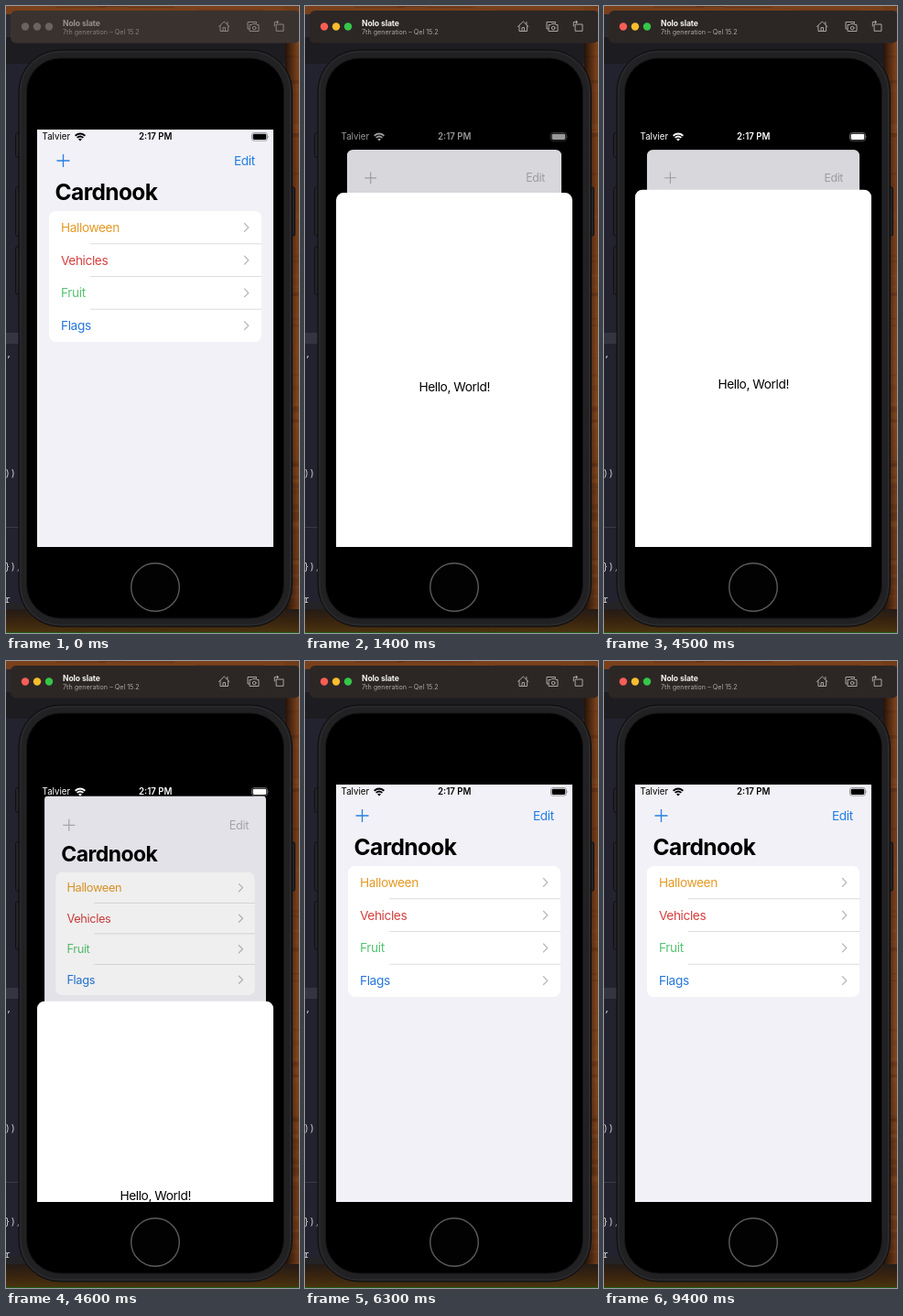
Recreate the animation shown at these times as an HTML page. Size 320 by 685 pixels, loop 9.5 s.

```html
<!DOCTYPE html>
<html lang="en">
<head>
<meta charset="utf-8">
<title>Sheet demo</title>
<style>
  html, body { margin: 0; height: 100%; overflow: hidden; background: #000; }
  svg { display: block; width: 100%; height: 100%; }
  text { font-family: Inter, Roboto, "Liberation Sans", sans-serif; }
  .body { font-size: 13.7px; letter-spacing: -.4px; }
  .code { font: 10px "Noto Sans Mono", "DejaVu Sans Mono", monospace; fill: #d8d8dc; }
  .code text { font: inherit; }
  .status { font-size: 9.7px; }
  .line { fill: none; stroke-linecap: round; stroke-linejoin: round; }
</style>
</head>
<body>
<svg viewBox="0 0 320 685">
  <defs>
    <linearGradient id="wood" x2="0" y2="1">
      <stop offset="0" stop-color="#7a401b"/>
      <stop offset=".3" stop-color="#733c1a"/>
      <stop offset=".6" stop-color="#7f451e"/>
      <stop offset="1" stop-color="#633416"/>
    </linearGradient>
    <linearGradient id="shade">
      <stop offset="0" stop-opacity=".7"/>
      <stop offset="1" stop-opacity="0"/>
    </linearGradient>
    <linearGradient id="floor" x2="0" y2="1">
      <stop offset="0" stop-color="#241c17"/>
      <stop offset=".5" stop-color="#38230f"/>
      <stop offset="1" stop-color="#4a3410"/>
    </linearGradient>
    <clipPath id="screen"><rect x="34" y="135" width="258" height="456"/></clipPath>
    <clipPath id="cardClip"><rect id="cardShape" x="34" y="135" width="258" height="470"/></clipPath>
  </defs>

  <!-- desktop and editor -->
  <rect width="320" height="685" fill="url(#wood)"/>
  <g id="grain"></g>
  <rect x="305" y="40" width="13" height="626" fill="url(#shade)"/>
  <rect y="9" width="305" height="657" fill="#2a2a30"/>
  <rect y="34" width="305" height="29" fill="#1d1c21"/>
  <rect y="63" width="305" height="588" fill="#22232f"/>
  <rect y="357" width="14" height="12" fill="#343541"/>
  <path d="M0 569.5H20" stroke="#3a3b46"/>
  <rect y="651" width="305" height="8" fill="#242326"/>
  <rect y="659" width="320" height="25" fill="url(#floor)"/>
  <g class="code">
    <text x="0" y="383">,</text>
    <text x="-1.5" y="514">))</text>
    <text x="-1.5" y="616">}),</text>
    <text x="-1.5" y="652">r</text>
  </g>
  <rect y="684" width="320" height="1" fill="#1f5a17"/>

  <!-- simulator title bar -->
  <rect id="bar" x="5" y="5" width="316" height="35.5" rx="6"/>
  <g id="lights"></g>
  <text id="device" x="62" y="22" font-size="8.6" font-weight="700" letter-spacing="-.1">Nolo slate</text>
  <text id="system" x="62" y="31" font-size="7.2">7th generation – Qel 15.2</text>
  <g id="icons" class="line" stroke-width="1">
    <path d="M232.5 22.5L238.3 17L244 22.5M234 21.5V27.5H242.6V21.5M237 27.3V23.6H239.6V27.3M241.9 20V17.5"/>
    <path d="M265.5 25H264V17.5H273.5V19"/>
    <path d="M266.5 20.5H268.5L269.3 19.5H273L273.8 20.5H276V27.5H266.5Z"/>
    <circle cx="271.2" cy="24" r="1.8"/>
    <path d="M295.5 20H303V27.3H295.5ZM293.3 22V17.5H297.5M296 16L297.6 17.5L296 19"/>
  </g>

  <!-- phone -->
  <g fill="#242427" stroke="#101012">
    <rect x="10.5" y="139" width="6" height="26" rx="1.5"/>
    <rect x="10.5" y="198" width="6" height="53" rx="1.5"/>
    <rect x="10.5" y="263" width="6" height="52" rx="1.5"/>
    <rect x="309" y="198" width="6.5" height="53" rx="1.5"/>
  </g>
  <rect x="14" y="48" width="298.5" height="630" rx="45" fill="#212123" stroke="#0d0d0e"/>
  <rect x="16" y="50" width="294.5" height="626" rx="43" fill="none" stroke="#2e2e30"/>
  <rect x="22.5" y="57" width="281" height="612" rx="37" fill="#000" stroke="#151516"/>
  <circle cx="163" cy="635" r="26.3" fill="#020202" stroke="#5c5c5d" stroke-width="1.4"/>

  <g clip-path="url(#screen)">
    <g id="card"><g clip-path="url(#cardClip)">
      <rect x="34" y="135" width="258" height="470" fill="#f2f1f7"/>
      <g id="nav">
        <path id="plus" d="M55.5 169H69.5M62.5 162V176" stroke="currentColor" stroke-width="1.3"/>
        <text class="body" x="249" y="173.5" fill="currentColor">Edit</text>
      </g>
      <text x="53.5" y="211.5" font-size="24.5" font-weight="700" letter-spacing="-.6">Cardnook</text>
      <rect x="47" y="224" width="232" height="143" rx="7.5" fill="#fff"/>
      <g id="rows"></g>
      <rect id="dim" x="34" y="135" width="258" height="470"/>
    </g></g>
    <g id="status">
      <text class="status" x="39.6" y="146.4" fill="currentColor">Talvier</text>
      <g class="line" stroke="currentColor" stroke-width="1.8" style="stroke-linecap:butt">
        <path d="M75.6 141.7Q81 137.2 86.4 141.7M77.6 143.9Q81 141.1 84.4 143.9"/>
      </g>
      <path d="M79 145.4Q81 143.9 83 145.4L81 147.6Z" fill="currentColor"/>
      <text class="status" x="163.3" y="146.4" font-weight="600" text-anchor="middle" fill="currentColor">2:17 PM</text>
      <rect x="268.5" y="138.5" width="17" height="8.6" rx="2.4" fill="none" stroke="currentColor" stroke-opacity=".45" stroke-width=".8"/>
      <rect x="269.7" y="139.7" width="14.6" height="6.2" rx="1.4" fill="currentColor"/>
      <path d="M286.6 141.4Q288 142.8 286.6 144.2Z" fill="currentColor" opacity=".5"/>
    </g>
    <g id="sheet">
      <rect x="34" y="167" width="258" height="470" rx="8" fill="#fff"/>
      <text class="body" x="163.2" y="384" text-anchor="middle">Hello, World!</text>
    </g>
  </g>
</svg>
<script>
const LOOP = 9500, STEP = 100;
const SCREEN_TOP = 135, SCREEN_MID = 163, TRAVEL = 424;
const BLUE = [38, 127, 226], GRAY = [176, 176, 181];
const BLACK = [0, 0, 0], WHITE = [255, 255, 255];

const $ = id => document.getElementById(id);
const add = (parent, tag, attrs, text) => {
  const el = document.createElementNS('http://www.w3.org/2000/svg', tag);
  for (const k in attrs) el.setAttribute(k, attrs[k]);
  if (text) el.textContent = text;
  return parent.appendChild(el);
};

const rows = [['Halloween', '#e59a25'], ['Vehicles', '#d5403f'],
              ['Fruit', '#55c472'], ['Flags', '#2576dc']];
rows.forEach(([name, fill], i) => {
  const y = 241.9 + i * 35.75;
  add($('rows'), 'text', { class: 'body', x: 60, y: y + 4.9, fill }, name);
  add($('rows'), 'path', { class: 'line', d: `M260.5 ${y - 4.3}l4.3 4.3l-4.3 4.3`,
    stroke: '#bdbdc1', 'stroke-width': 1.4 });
  if (i) add($('rows'), 'path', { d: `M92 ${y - 17.9}H279`, stroke: '#d5d5d9', 'stroke-width': .8 });
});

const lights = [21, 34, 47].map(cx => add($('lights'), 'circle', { cx, cy: 22.5, r: 4.2 }));

let seed = 7;
const rnd = () => (seed = seed * 16807 % 2147483647) / 2147483647;
for (let i = 0; i < 60; i++) {
  add($('grain'), 'rect', { x: 304, y: rnd() * 685, width: 16, height: 1 + rnd() * 5,
    fill: rnd() < .5 ? '#4e2710' : '#95552a', opacity: .1 + rnd() * .25 });
}
for (let i = 0; i < 8; i++) {
  add($('grain'), 'rect', { x: rnd() * 320, y: rnd() * 8,
    width: 30 + rnd() * 90, height: 1, fill: '#3f1f0d', opacity: .35 });
}

// critically damped spring from 0 to 1
const spring = (t, start, rate) => {
  const x = Math.max(0, t - start) / 1000 * rate;
  return 1 - (1 + x) * Math.exp(-x);
};
const ramp = (t, a, b) => Math.min(1, Math.max(0, (t - a) / (b - a)));
const mix = (a, b, k) => `rgb(${a.map((v, i) => Math.round(v + (b[i] - v) * k))})`;

function draw(t) {
  const active = t >= 900;
  $('bar').setAttribute('fill', active ? '#2c2725' : '#3a322f');
  $('device').setAttribute('fill', active ? '#f4f3f2' : '#969190');
  $('system').setAttribute('fill', active ? '#aaa6a4' : '#857f7d');
  $('icons').setAttribute('stroke', active ? '#aaa5a3' : '#8a8380');
  lights.forEach((el, i) =>
    el.setAttribute('fill', active ? ['#f95e56', '#f8bc2e', '#35c649'][i] : '#6a6361'));

  // on the way back the card grows a little later than the sheet falls
  const shown = spring(t, 1157, 16.7);
  const lift = shown - spring(t, 4460, 11.6);
  const shrink = shown - spring(t, 4487, 11.6);
  $('sheet').setAttribute('transform', `translate(0 ${TRAVEL * (1 - lift)})`);
  $('card').setAttribute('transform',
    `translate(${SCREEN_MID} ${SCREEN_TOP + 24 * lift}) scale(${1 - .1 * shrink}) translate(${-SCREEN_MID} ${-SCREEN_TOP})`);
  $('cardShape').setAttribute('rx', 8 * lift);
  $('dim').setAttribute('opacity', .12 * lift);

  const tint = ramp(t, 1100, 1200) - ramp(t, 4600, 4950);
  $('nav').style.color = mix(BLUE, GRAY, tint);
  $('plus').setAttribute('opacity', t >= 1100 && t < 1300 ? .4 : 1);
  const light = ramp(t, 1280, 1480) - ramp(t, 4650, 4900);
  $('status').style.color = mix(BLACK, WHITE, light);
}

const begin = performance.now();
function tick() {
  const t = (performance.now() - begin) % LOOP;
  draw(Math.floor(t / STEP) * STEP);
  requestAnimationFrame(tick);
}
tick();
</script>
</body>
</html>
```
